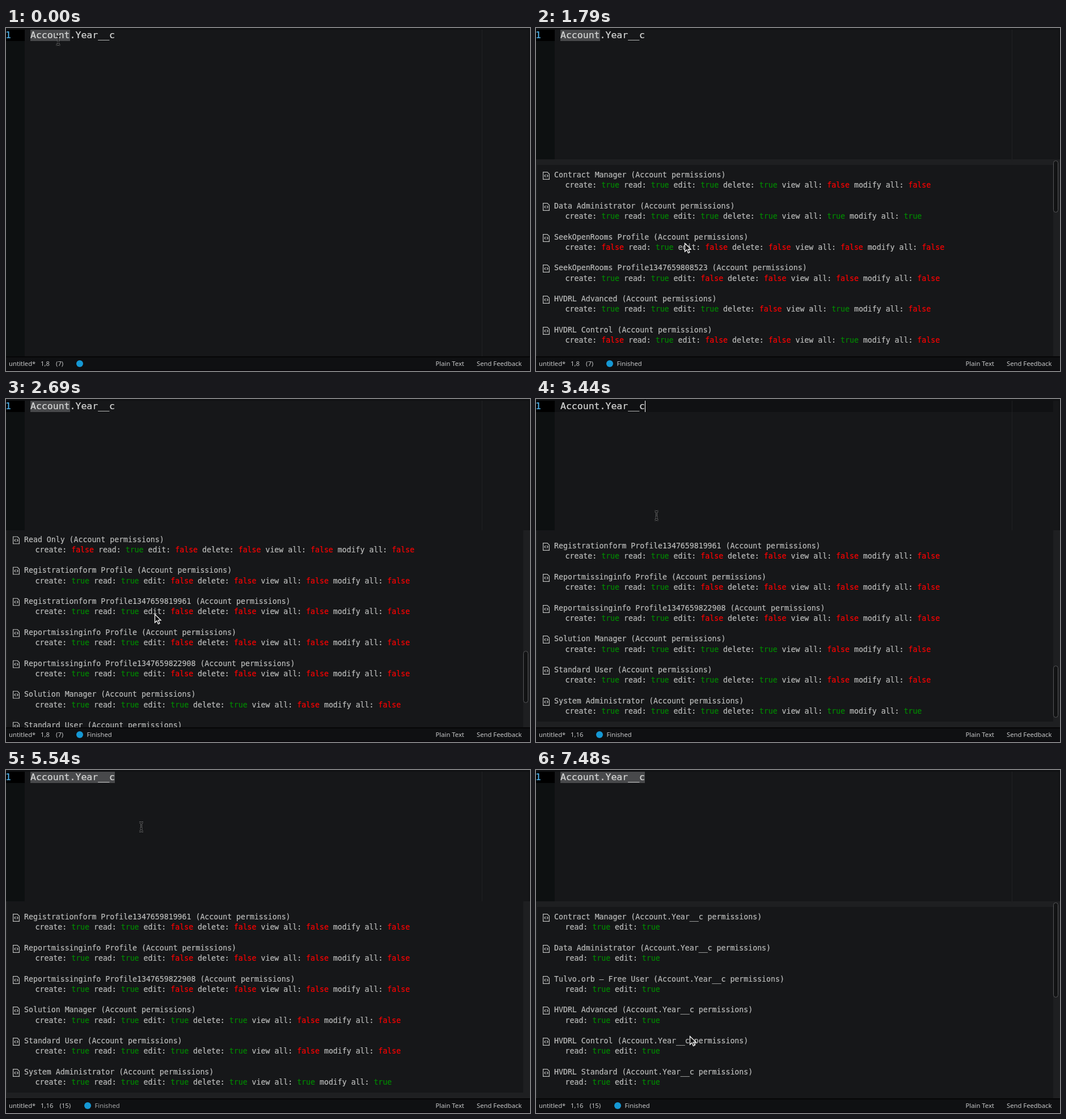
Recreate the animation shown at these times as an HTML page. Size 924x606 px, loop 8000 ms.

```html
<!DOCTYPE html>
<html lang="en">
<head>
<meta charset="utf-8">
<title>Permission lookup</title>
<style>
  html, body { margin: 0; width: 100%; height: 100%; overflow: hidden; background: #161719; }
  #stage { position: relative; width: 924px; height: 606px; overflow: hidden; background: #161719; }
  #stage div, #stage svg, #stage .at { position: absolute; }
  .mono { font-family: "DejaVu Sans Mono", monospace; white-space: pre; -webkit-text-stroke: .2px; }
  #top { left: 0; top: 0; width: 924px; height: 3px; background: #101113; }
  #gutter { left: 0; top: 3px; width: 33px; height: 577px; background: #0d1011; }
  #number { left: 0; top: 3px; width: 33px; height: 20px; background: #000; color: #52b6f0; text-indent: -1px; }
  #guide { left: 839px; top: 3px; width: 1px; height: 577px; background: #1f2022; }
  #edge { left: 922px; top: 0; width: 2px; height: 580px; background: #101113; }
  #line { left: 33px; top: 3px; width: 879px; height: 20px; background: #101113; }
  #select { left: 43px; top: 3px; height: 20px; background: #48494b; }
  #code { left: 43px; top: 3px; color: #d8d9d8; }
  #number, #code { font-size: 16.5px; line-height: 20px; }
  #caret { left: 192px; top: 3px; width: 1px; height: 20px; background: #fff; }
  #panel { left: 0; top: 232px; width: 924px; height: 348px; overflow: hidden; background: #1e1f21; }
  .list { left: 2px; top: 10px; width: 910px; background: #161719; color: #bcbdbc; font-size: 13.23px; line-height: 18.25px; }
  .item { left: 0; height: 36.5px; }
  .item svg { left: 10px; top: 3px; }
  .title { left: 30px; }
  .perms { left: 49.5px; top: 18.25px; }
  .true { color: #008a00; }
  .false { color: #f00; }
  #thumb { left: 912px; width: 7px; border: 1px solid #555658; border-radius: 5px; background: #121314; }
  #bar { left: 0; top: 580px; width: 924px; height: 26px; background: #0f1012; border-top: 2px solid #060607; box-sizing: border-box;
    font: 11.25px/22px "Noto Sans", sans-serif; color: #c6c7c8; white-space: pre; }
  #bar .at { top: 0; }
  #bar::after { content: ""; position: absolute; left: 0; bottom: 0; width: 100%; height: 2px; background: #0b080d; }
  #mark { top: 5px; width: 12px; height: 12px; border-radius: 50%; background: #1598d4; }
  #beam, #arrow { left: 0; top: 0; }
</style>
</head>
<body>
<div id="stage">
  <div id="gutter"></div>
  <div id="top"></div>
  <div id="line"></div>
  <div id="number" class="mono">1</div>
  <div id="guide"></div>
  <div id="edge"></div>
  <div id="select"></div>
  <div id="code" class="mono">Account.Year__c</div>
  <div id="caret"></div>
  <div id="panel"></div>
  <div id="thumb"></div>
  <div id="bar">
    <span class="at" style="left:5px">untitled*</span>
    <span class="at" id="pos" style="left:61px"></span>
    <span class="at" id="count"></span>
    <div id="mark"></div>
    <span class="at" id="status"></span>
    <span class="at" style="left:757.5px">Plain Text</span>
    <span class="at" style="left:830px">Send Feedback</span>
  </div>
  <svg id="beam" width="11" height="19" viewBox="-5.5 -9.5 11 19" fill="none">
    <path id="stem" d="M-3.5 -8Q0 -8 0 -5.5Q0 -8 3.5 -8M0 -6V6M-3.5 8Q0 8 0 5.5Q0 8 3.5 8M-2 3H2" stroke="#808182" stroke-width="3"/>
    <path d="M-3.5 -8Q0 -8 0 -5.5Q0 -8 3.5 -8M0 -6V6M-3.5 8Q0 8 0 5.5Q0 8 3.5 8M-2 3H2" stroke="#0c0d0e" stroke-width="1.5"/>
  </svg>
  <svg id="arrow" width="14" height="20" viewBox="-1 -1 14 20">
    <path d="M.5 .5V15L4 11.8L6.4 17.5L8.9 16.4L6.5 10.9H11Z" fill="#0a0a0a" stroke="#fff" stroke-width="1.3"/>
  </svg>
</div>
<script>
const LOOP = 8000, ROW = 54.75, VIEW = 6, TRACK = 329;
const $ = id => document.getElementById(id);

const objectKeys = ["create", "read", "edit", "delete", "view all", "modify all"];
const fieldKeys = ["read", "edit"];
const objectRows = [
  ["Contract Manager", "111100"],
  ["Data Administrator", "111111"],
  ["SeekOpenRooms Profile", "010000"],
  ["SeekOpenRooms Profile1347659808523", "110000"],
  ["HVDRL Advanced", "111010"],
  ["HVDRL Control", "010010"],
  ["HVDRL Standard", "111000"],
  ["HVDRL View", "010010"],
  ["Marketing User", "111100"],
  ["Meetings Profile", "110000"],
  ["Meetings Profile1347659813407", "110000"],
  ["Nomination Profile", "110000"],
  ["Nomination Profile1347659816214", "110000"],
  ["Partner User", "111000"],
  ["Read Only", "010000"],
  ["Registrationform Profile", "110000"],
  ["Registrationform Profile1347659819961", "110000"],
  ["Reportmissinginfo Profile", "110000"],
  ["Reportmissinginfo Profile1347659822908", "110000"],
  ["Solution Manager", "111100"],
  ["Standard User", "111100"],
  ["System Administrator", "111111"]
];
const fieldRows = [
  "Contract Manager", "Data Administrator", "Tulvo.orb – Free User",
  "HVDRL Advanced", "HVDRL Control", "HVDRL Standard",
  "Marketing User", "Read Only", "Solution Manager",
  "Standard Platform User", "Standard User", "System Administrator"
].map(name => [name, "11"]);

const icon = `<svg width="12" height="14" fill="none" stroke="#bcbdbc" stroke-width="1.2">
  <path d="M8 .6H.6V13.4H11.4V4ZM5 5L3 7.2L5 9.4M7 5L9 7.2L7 9.4"/></svg>`;

function makeList(rows, keys, subject) {
  const list = document.createElement("div");
  list.className = "list mono";
  list.style.height = rows.length * ROW - .25 + "px";
  list.innerHTML = rows.map(([name, bits], i) => {
    const perms = keys.map((key, k) => {
      const value = bits[k] === "1";
      return `${key}: <span class="${value}">${value}</span>`;
    }).join(" ");
    return `<div class="item" style="top:${9 + i * ROW}px">${icon}` +
      `<div class="title">${name} (${subject} permissions)</div><div class="perms">${perms}</div></div>`;
  }).join("");
  $("panel").append(list);
  return { node: list, max: (rows.length - VIEW) * ROW, thumb: rows.length > 12 ? 92 : 168 };
}
const lists = {
  object: makeList(objectRows, objectKeys, "Account"),
  field: makeList(fieldRows, fieldKeys, "Account.Year__c")
};

// Each step holds only what changes; left = distance from the end of the list.
const steps = [
  [0, { list: null, left: 0, bar: 0, mouse: ["beam", 92, 22], sel: 7, pos: "1,8", status: "", dim: 1 }],
  [150, { status: "Retrieving..." }],
  [450, { list: "object", status: "Finished" }],
  [600, { bar: 1 }],
  [1050, { mouse: ["beam", 165, 185] }],
  [1200, { mouse: ["arrow", 262, 380], bar: .5 }],
  [1340, { bar: 0 }],
  [1640, { bar: 1, left: 420 }],
  [1790, { left: 876 }],
  [2390, { left: 680 }],
  [2540, { left: 320 }],
  [2690, { left: 97.5 }],
  [2840, { left: 24 }],
  [2990, { left: 0 }],
  [3140, { mouse: ["beam", 212.5, 206] }],
  [3440, { sel: 0, pos: "1,16" }],
  [3590, { mouse: ["beam", 228, 140] }],
  [3740, { mouse: ["beam", 238.5, 100.5], bar: .5 }],
  [3890, { bar: 0 }],
  [4190, { sel: 15 }],
  [5540, { dim: .82 }],
  [5690, { dim: .3 }],
  [5840, { status: "Retrieving...", dim: 1 }],
  [6140, { list: "field", status: "Finished", bar: 1 }],
  [6590, { mouse: ["arrow", 258, 330] }],
  [6740, { mouse: ["arrow", 271, 470] }],
  [7190, { left: 110 }],
  [7340, { left: 270 }],
  [7480, { left: 328.5 }]
];
let state = {};
const states = steps.map(([, change]) => state = { ...state, ...change });

function draw(s) {
  const panel = lists[s.list];
  $("panel").style.display = panel ? "" : "none";
  for (const l of Object.values(lists)) l.node.style.display = l === panel ? "" : "none";
  $("thumb").style.opacity = panel ? s.bar : 0;
  if (panel) {
    const scroll = Math.max(0, panel.max - s.left);
    panel.node.style.transform = `translateY(${-scroll}px)`;
    $("thumb").style.top = 234 + scroll / panel.max * (TRACK - panel.thumb) + "px";
    $("thumb").style.height = panel.thumb - 2 + "px";
  }

  $("select").style.width = (s.sel === 7 ? 69.5 : s.sel ? 149 : 0) + "px";
  $("line").style.display = $("caret").style.display = s.sel ? "none" : "";

  const [shape, x, y] = s.mouse;
  for (const id of ["beam", "arrow"]) $(id).style.display = id === shape ? "" : "none";
  const [dx, dy] = shape === "beam" ? [5.5, 9.5] : [1, 1];
  $(shape).style.transform = `translate(${x - dx}px, ${y - dy}px)`;

  const mark = s.sel === 7 ? 130 : s.sel ? 144 : 112;
  $("pos").textContent = s.pos;
  $("count").textContent = s.sel ? `(${s.sel})` : "";
  $("count").style.left = (s.sel === 7 ? 88 : 94.5) + "px";
  $("mark").style.left = mark - 6 + "px";
  $("status").style.left = mark + 12.5 + "px";
  $("status").textContent = s.status;
  $("status").style.opacity = s.dim;
}

const start = performance.now();
let shown = -1;
function tick() {
  const t = (performance.now() - start) % LOOP;
  const i = steps.findLastIndex(([at]) => at <= t);
  if (i !== shown) draw(states[shown = i]);
  requestAnimationFrame(tick);
}
tick();
</script>
</body>
</html>
```
